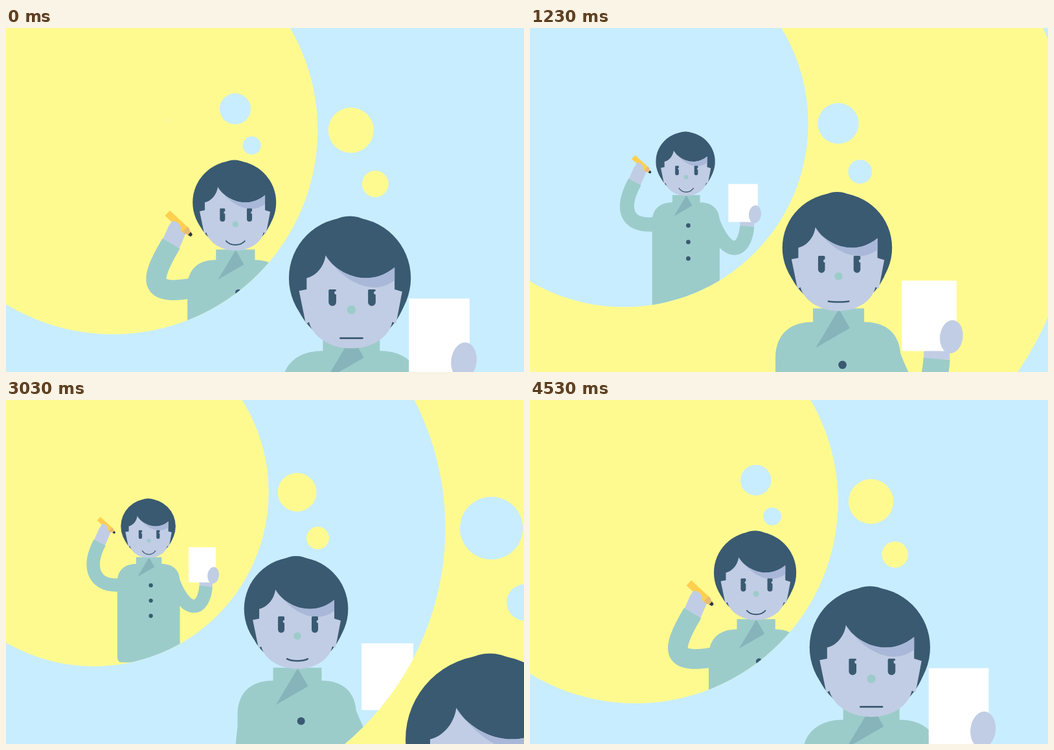
An HTML page with a canvas that plays this animation: 800x533 px, repeating every 4560 ms.

```html
<!DOCTYPE html>
<html lang="en">
<head>
<meta charset="utf-8">
<title>Thoughts within thoughts</title>
<style>
html, body { margin: 0; width: 100%; height: 100%; overflow: hidden; background: #c8edff; }
canvas { display: block; width: 800px; height: 533px; }
</style>
</head>
<body>
<canvas id="stage" width="800" height="533"></canvas>
<script>
const ctx = document.getElementById('stage').getContext('2d');
const LEVEL = 2280, LOOP = 2 * LEVEL, STEP = 30;
const ORIGIN = { x: -34.5, y: 53 };
const COLORS = ['#c8edff', '#fffa90'];
const HAIR = '#3a5a72', SKIN = '#c1cde4', SHADE = '#a9b8d8';
const COAT = '#9cccca', FOLD = '#86b4ba';

// cuff, two curve controls, shoulder, pencil centre, pencil angle
const LOW = [307, 532, 306, 570, 337, 552, 366, 525, 315, 520, 71];
const RAISED = [306, 372, 270, 440, 285, 500, 360, 497, 327, 323, 42];
const TIRED = [327, 404, 282, 480, 282, 507, 380, 487, 343, 367, 43];
const HANGING = [370, 640, 370, 580, 375, 500, 386, 465, 370, 680, 80];

const HEAD = new Path2D('M-59-42C-48-44-36-56-34-72C-22-50 20-26 57-56V-27L67-24L59 18L54 16' +
  'C49 38 25 51 0 51C-25 51-50 38-56 16L-60 19L-69-25L-59-27Z');
const FRINGE_SHADE = new Path2D('M-34-72C-22-50 20-26 57-56V-39C30-18-8-34-34-72Z');
const TUFTS = new Path2D('M-74-10Q-66 14-47 30L-38 10ZM71-10Q63 14 45 30L36 10Z');
const TORSO = new Path2D('M413 415H488V435C520 435 541 452 541.5 486V710Q541 725 526 725' +
  'H373Q358 725 358 710V486C359 452 380 435 413 435Z');
const LAPEL = new Path2D('M451 416L467 444L417 473Z');

const clamp = x => Math.max(0, Math.min(1, x));
const mix = (a, b, u) => a.map((v, i) => v + (b[i] - v) * u);
function ease(age, start, time) {
  const u = clamp((age - start) / time);
  return u * u * (3 - 2 * u);
}

// ease in, ease out, then a last push towards the viewer
function zoomAt(age) {
  const turn = 2.265, t = age / 1000;
  const rise = .286 * Math.min(1, t / turn) ** 2.6;
  const settle = .2815 * (1 - (1 - clamp(t / turn - 1)) ** 3.1);
  const push = .503 * Math.max(0, t - 4.257) ** 1.41;
  return .51 + rise + settle + push;
}

function armAt(age) {
  let pose = mix(LOW, RAISED, ease(age, 240, 460));
  pose = mix(pose, TIRED, ease(age, 700, 1700));
  return mix(pose, HANGING, ease(age, 2560, 400));
}

function fill(path, color) {
  ctx.fillStyle = color;
  ctx.fill(path);
}
function oval(x, y, rx, ry, color, turn = 0) {
  ctx.beginPath();
  ctx.ellipse(x, y, rx, ry, turn, 0, 2 * Math.PI);
  ctx.fillStyle = color;
  ctx.fill();
}
const dot = (x, y, r, color) => oval(x, y, r, r, color);

function stroke(color, width, cap, draw) {
  ctx.beginPath();
  draw();
  ctx.strokeStyle = color;
  ctx.lineWidth = width;
  ctx.lineCap = cap;
  ctx.stroke();
}
function limb(x, y, ...curve) {
  stroke(COAT, 39, 'butt', () => {
    ctx.moveTo(x, y);
    ctx.bezierCurveTo(...curve);
  });
}

function pencilArm(age) {
  const pose = armAt(age);
  const [cx, cy] = pose, [px, py, angle] = pose.slice(8);
  stroke(SKIN, 36, 'round', () => {
    ctx.moveTo(cx, cy);
    ctx.lineTo(cx + (px - cx) * .68, cy + (py - cy) * .68);
  });
  limb(...pose.slice(0, 8));
  ctx.save();
  ctx.translate(px, py);
  ctx.rotate(angle * Math.PI / 180);
  fill(new Path2D('M-32-7H18V7H-32Z'), '#ffcf50');
  fill(new Path2D('M14-7H19L27-3V3L19 7H14Z'), '#e8bd72');
  fill(new Path2D('M26-4L32-2.5V2.5L26 4Z'), '#2b3540');
  oval(-3, 7, 12, 7, SKIN);
  ctx.restore();
}

function paperArm(x, y) {
  const cx = x + 51, cy = y + 115;
  ctx.fillStyle = SKIN;
  ctx.fillRect(cx - 19, cy - 30, 38, 31);
  limb(cx, cy, cx - 6, cy + 74, 560, 590, 520, 480);
}

function paper(x, y) {
  ctx.fillStyle = '#fff';
  ctx.fillRect(x, y, 80, 103.5);
  oval(x + 72.5, y + 82.5, 16.8, 24.5, SKIN, .12);
}

function eye(x, top) {
  ctx.beginPath();
  ctx.roundRect(x - 5, top, 10, -5 - top, [1.5, 1.5, 5, 5]);
  ctx.fillStyle = HAIR;
  ctx.fill();
  dot(x + 5, -22.5, 2.3, SKIN);
}

function mouth(smile, shown) {
  if (!shown) return;
  const half = (14.5 + 5 * smile) * shown, y = 37.5 - 7 * smile, dip = y + 14 * smile;
  stroke(HAIR, 2.4, 'round', () => {
    ctx.moveTo(-half, y);
    ctx.bezierCurveTo(-half / 2, dip, half / 2, dip, half, y);
  });
}

function head(age) {
  const drop = 21 * ease(age, 3100, 2300);
  const lid = -30.5 + drop * .24;
  ctx.save();
  ctx.translate(450.5, 366 + drop);
  dot(-2, -42, 80.4, HAIR);
  oval(-2, -106, 28, 18, HAIR);
  fill(TUFTS, HAIR);
  fill(HEAD, SKIN);
  fill(FRINGE_SHADE, SHADE);
  eye(-25, lid);
  eye(27, lid);
  dot(0, 0, 5.8, COAT);
  mouth(1 - ease(age, 1300, 2700), ease(age, 280, 250));
  ctx.restore();
}

function person(age) {
  const tired = (age / 1000) ** 2;
  const x = 568 - 2 * tired;
  const y = 386.5 - tired + 270 * (1 - ease(age, 300, 380));
  ctx.translate(0, -7 * (1 - ease(age, 240, 460)));
  pencilArm(age);
  paperArm(x, y);
  fill(TORSO, COAT);
  fill(LAPEL, FOLD);
  for (let i = 0; i < 3; i++) dot(456.2, 498 + 45 * i, 6, HAIR);
  head(age);
  paper(x, y);
}

function level(age, tint) {
  const zoom = zoomAt(age), inner = COLORS[1 - tint];
  ctx.fillStyle = COLORS[tint];
  ctx.fillRect(0, 0, 800, 533);

  ctx.save();
  ctx.translate(ORIGIN.x, ORIGIN.y);
  ctx.scale(zoom, zoom);
  ctx.translate(-ORIGIN.x, -ORIGIN.y);
  dot(482, 214, 17.5 * ease(age, 1400, 220), inner);
  dot(450, 143, 30 * ease(age, 1680, 220), inner);
  person(age);
  ctx.restore();

  if (age < LEVEL) return;
  const size = ease(age, 2265, 350), rest = 1 - size;
  ctx.save();
  ctx.beginPath();
  ctx.arc(ORIGIN.x + (170.5 + 185 * rest) * zoom, ORIGIN.y + (90 + 22 * rest) * zoom,
    270 * size * zoom, 0, 2 * Math.PI);
  ctx.clip();
  level(age - LEVEL, 1 - tint);
  ctx.restore();
}

function render(time) {
  const t = Math.floor(time % LOOP / STEP) * STEP;
  level(t % LEVEL + LOOP, t < LEVEL ? 0 : 1);
}

const start = performance.now();
function tick() {
  render(performance.now() - start);
  requestAnimationFrame(tick);
}
tick();
</script>
</body>
</html>
```
